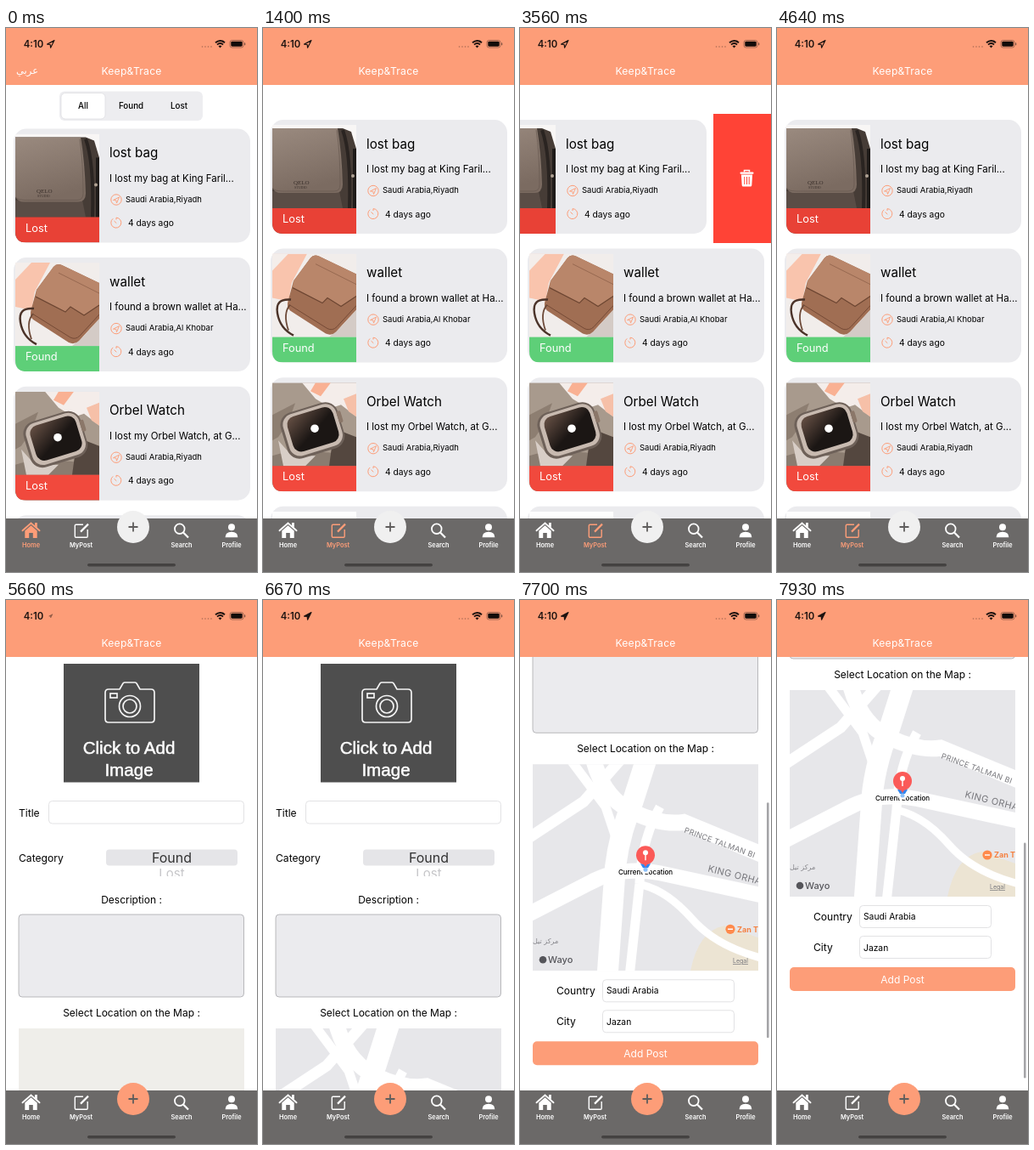
Write an HTML page that moves like this. It is 296 px wide and 640 px high and loops after 8 s.

```html
<!DOCTYPE html>
<html lang="en">
<head>
<meta charset="utf-8">
<title>Lost items app</title>
<style>
  html, body { margin: 0; width: 100%; height: 100%; overflow: hidden; background: #fff; }
  svg { display: block; width: 296px; height: 640px; font-family: Inter, sans-serif; }
  .mid { text-anchor: middle; }
  .arabic { font-family: "DejaVu Sans", "Noto Sans", sans-serif; }
</style>
</head>
<body>
<svg id="stage" viewBox="0 0 296 640" xmlns="http://www.w3.org/2000/svg"></svg>
<script>
const LOOP = 8000;
const SALMON = '#fd9d78', RED = '#ff4336', GREEN = '#4bcb69', CARD = '#ebebee';
const PITCH = 151.6;

const text = (x, y, size, str, attrs = '') =>
  `<text x="${x}" y="${y}" font-size="${size}" ${attrs}>${str}</text>`;
const mid = (x, y, size, str, attrs = '') => text(x, y, size, str, 'class="mid" ' + attrs);
const rect = (x, y, w, h, fill, rx = 0, attrs = '') =>
  `<rect x="${x}" y="${y}" width="${w}" height="${h}" rx="${rx}" fill="${fill}" ${attrs}/>`;
const circle = (x, y, r, fill, attrs = '') =>
  `<circle cx="${x}" cy="${y}" r="${r}" fill="${fill}" ${attrs}/>`;
const path = (d, fill, attrs = '') => `<path d="${d}" fill="${fill}" ${attrs}/>`;
const line = (d, color, width, attrs = '') =>
  path(d, 'none', `stroke="${color}" stroke-width="${width}" ${attrs}`);

// Photos, in card coordinates
const bag = () =>
  rect(11, 6, 99, 128, '#f8f6f5') +
  path('M11 10H94L104 14 110 34V134H11Z', '#463c36') +
  path('M11 84H90L94 104H11Z', '#5a4d46') +
  path('M11 10H88Q93 40 94 76Q94 86 85 86H21Q14 86 11 80Z', 'url(#flap)') +
  line('M11 81Q15 84 22 84H84Q91 84 91 76Q91 40 87 12', '#665850', .7) +
  line('M94 12Q104 40 102 104', '#2a2421', 4) +
  line('M108 34V104', '#1f1b19', 4) +
  circle(106, 66, 2, '#b0a294') +
  text(36, 75.5, 7, 'QELO', 'font-family="Liberation Serif, serif" fill="#3a302b"') +
  text(37, 80.5, 4, 'STUDIO', 'font-family="Liberation Serif, serif" fill="#3a302b"');

const wallet = () =>
  rect(11, 6, 99, 128, '#f1edeb') +
  path('M11 6H52L34 40 30 62 11 58Z', '#f9c4ad') +
  path('M11 6H30L11 26Z', '#f4eeeb') +
  path('M92 92 110 72V104H78Z', '#d4cbc6') +
  path('M36 38 56 11Q60 6 66 9L110 30V72L86 98Q81 103 74 100L32 73Q27 69 30 60Z', '#a06e53') +
  path('M36 38 56 11Q60 6 66 9L110 30V56L92 68 76 58 70 64 35 46Z', '#b9866a') +
  line('M35 46 70 64 76 58 92 68 110 56', '#6d4632', 1.2) +
  line('M62 18 110 42', '#8e6149', .8) +
  line('M31 66 76 94Q82 97 87 92L110 67', '#754a36', 1) +
  line('M33 60Q14 58 17 76T36 102', '#4b3329', 2.5) +
  line('M32 66Q23 76 30 96', '#6d4a39', 1.8);

const watch = () =>
  rect(11, 6, 99, 128, '#a89a8d') +
  path('M46 6H110V46L92 32 80 36 62 25Z', '#f4edea') +
  path('M62 6 80 6 68 22 56 16Z', '#f9b193') +
  path('M95 25 110 19V46L101 40Z', '#f6c0a8') +
  path('M11 92Q40 82 110 92V134H11Z', '#8a7c70') +
  path('M11 44 38 30 30 52 18 70 11 74Z', '#8d7e71') +
  path('M84 60 110 70V104H78Z', '#54473f') +
  path('M18 74 34 92 62 92 50 104H24Z', '#d8cec7') +
  `<g transform="translate(59 61) rotate(-17)">` +
  rect(-36, -27, 70, 56, '#6e6159', 15) + rect(-33, -25, 65, 51, '#c8bab0', 13) +
  rect(-28, -21.5, 56, 43, 'url(#screen)', 10) + rect(32, -12, 5, 14, '#8b7769', 2) + '</g>' +
  circle(61, 60, 4.8, '#fff');

const ITEMS = [
  { photo: bag, found: 0, title: 'lost bag', about: 'I lost my bag at King Faril...', city: 'Riyadh' },
  { photo: wallet, found: 1, title: 'wallet', about: 'I found a brown wallet at Ha...', city: 'Al Khobar' },
  { photo: watch, found: 0, title: 'Orbel Watch', about: 'I lost my Orbel Watch, at G...', city: 'Riyadh' },
  { photo: () => rect(11, 6, 99, 128, '#fdfdfd'), found: 0, title: '', about: '', city: 'Riyadh' }
];

const placeIcon = circle(130, 83.5, 6.2, 'none', `stroke="${SALMON}"`) +
  line('M126.5 84 133.5 80.5 130.5 87.5 129.8 84.3Z', SALMON, .9);
const clockIcon = line('M126.2 105.8A6 6 0 1 0 130 104.6V107M127.5 108.5 130.3 111.2', SALMON, 1);

const card = (item, i) => `<g class="card" data-y="${i * PITCH}">` +
  rect(9, 0, 279, 134, CARD, 15) +
  `<g clip-path="url(#photo)">${item.photo()}` +
  rect(11, 104, 99, 30, item.found ? GREEN : RED, 0, 'opacity=".88"') + '</g>' +
  text(23, 121, 12.8, item.found ? 'Found' : 'Lost', 'fill="#fff"') +
  text(122, 33.5, 15.2, item.title) +
  text(122, 62, 11.5, item.about) +
  placeIcon + text(141, 86, 9.5, 'Saudi Arabia,' + item.city) +
  clockIcon + text(144, 114.5, 10.3, '4 days ago') + '</g>';

const trash = `<g fill="#fff">` + rect(-8, -7.5, 16, 2.2, '#fff', 1) +
  line('M-3 -7.5V-9.5H3V-7.5', '#fff', 1.5) +
  path('M-6.6 -4.4H6.6L5.8 8Q5.7 9.5 4.2 9.5H-4.2Q-5.7 9.5 -5.8 8Z', '#fff') +
  line('M-2.7 -2V7M0 -2V7M2.7 -2V7', RED, 1) + '</g>';

const segments = rect(63, 74.5, 169, 34.5, '#ededf0', 6) +
  rect(65, 76.5, 52, 30.5, '#fff', 5, 'stroke="#dcdce0" stroke-width=".7"') +
  ['All', 'Found', 'Lost'].map((name, i) =>
    mid(91 + i * 56.5, 95.3, 9.8, name, 'font-weight="500"')).join('');

const field = (x, y, w, h) => rect(x, y, w, h, '#fff', 4, 'stroke="#e2e2e4"');

const mapArt = rect(0, 0, 266, 243, '#e7e7ea') +
  path('M186 243Q196 195 226 190L266 204V243Z', '#ece4d3') +
  line('M72 -4Q84 40 118 56T178 68L270 106', '#fff', 19) +
  line('M134 -6 118 44Q98 92 96 140L88 250', '#fff', 25) +
  line('M150 50Q128 90 126 140L114 250', '#fff', 11) +
  line('M44 -6 86 50 100 92', '#fff', 11) +
  line('M-4 176 66 140Q104 119 150 128L270 154', '#fff', 18) +
  line('M130 142Q160 150 188 182T270 228', '#fff', 9) +
  line('M-4 86 60 44 104 -6', '#fff', 13) +
  text(0, 0, 9, 'PRINCE TALMAN BI', 'transform="translate(178 80) rotate(20)" fill="#77777c" letter-spacing=".3"') +
  text(0, 0, 11, 'KING ORHAL', 'transform="translate(206 126) rotate(14)" fill="#77777c" letter-spacing=".4"') +
  circle(233, 194, 5.6, '#ff8a4c') + line('M230 194H236', '#fff', 1.4) +
  text(241, 197.3, 9, 'Zan Tr', `font-weight="700" fill="#f5803f"`) +
  text(0, 211, 8, 'مركز تيل', 'class="arabic" fill="#85858a"') +
  circle(12, 230, 4.3, '#55555a') + text(18, 234, 11, 'Wayo', 'fill="#55555a" font-weight="500"') +
  text(236, 234, 7, 'Legal', 'fill="#77777c" text-decoration="underline"') +
  mid(133, 130, 8, 'Current Location', 'font-weight="500" stroke="#fff" stroke-width="2" paint-order="stroke"') +
  circle(133, 122, 6.5, '#fff') + path('M127 117H139L136 122H130Z', '#2f86f0') +
  circle(133, 124, 2.5, '#8cc0f8') +
  path('M130 116H136L133 121Z', '#fb5a58') + circle(133, 107, 11, '#fb5a58') +
  circle(133, 104, 3, '#fff') + line('M133 106V113', '#fff', 1.4);

const arial = 'font-family="Liberation Sans, sans-serif" fill="#fff" stroke="#fff" stroke-width=".5"';
const form =
  rect(68, 75, 160, 139.5, '#4e4e4e') +
  `<g fill="none" stroke="#f4f4f4" stroke-width="1.7">` +
  '<path d="M121 105H134L138 98Q139 97 140 97H152Q153 97 154 98L158 105H171Q175 105 175 109V140Q175 144 171 144H121Q117 144 117 140V109Q117 105 121 105Z"/>' +
  '<circle cx="146" cy="125" r="12.5"/><circle cx="146" cy="125" r="8"/>' +
  '<rect x="123" y="110" width="8" height="5"/></g>' +
  mid(145, 181, 20.6, 'Click to Add', arial) + mid(145, 207, 20.6, 'Image', arial) +
  text(15, 254.5, 12.1, 'Title') + field(50.5, 236.5, 230, 26.5) +
  text(15, 308, 12.1, 'Category') + rect(118, 293.5, 155, 19, '#e5e5e8', 4) +
  mid(195.5, 309, 16, 'Found', 'fill="#333"') +
  `<g clip-path="url(#wheel)">` + mid(195.5, 326.5, 15, 'Lost', 'fill="#c6c6c9"') + '</g>' +
  mid(148, 356.5, 12, 'Description :') +
  rect(15, 370, 265.5, 97, CARD, 4, 'stroke="#a9a9ac" stroke-width=".8"') +
  mid(148, 490, 12, 'Select Location on the Map :') +
  `<g transform="translate(15 504)" clip-path="url(#mapBox)">` + rect(0, 0, 266, 243, '#efeeea') +
  `<g id="map">${mapArt}</g></g>` +
  text(43, 775, 12.1, 'Country') + field(97.5, 757.5, 155, 26) + text(102, 774, 10.3, 'Saudi Arabia') +
  text(43, 811, 12.1, 'City') + field(97.5, 793.5, 155, 26) + text(102, 810.5, 10.3, 'Jazan') +
  rect(15, 830, 266, 28, SALMON, 5) + mid(148, 848.5, 12, 'Add Post', 'fill="#fff"');

const header = rect(0, 0, 296, 67, SALMON) +
  text(20.8, 23, 11.3, '4:10', 'font-weight="600" fill="#1d1310"') +
  `<g id="arrow">${path('M-4.2 .3 4.2 -4.2 -.2 4.4 -.6 .7Z', 'none', 'stroke="#1d1310" stroke-width="1.2" stroke-linejoin="round"')}</g>` +
  [231.5, 235, 238.5, 242].map(x => circle(x, 22, .8, '#a96b53')).join('') +
  line('M247 17.3Q252.5 12.6 258 17.3M249 19.6Q252.5 16.6 256 19.6', '#1d1310', 1.9) +
  path('M250.5 21.3Q252.5 19.6 254.5 21.3L252.5 23.4Z', '#1d1310') +
  rect(264, 14.5, 16, 8.5, 'none', 2.5, 'stroke="#8d5a47" stroke-width=".8"') +
  rect(265.3, 15.8, 13.4, 5.9, '#120c0a', 1.4) + rect(281, 17.3, 1.3, 3, '#8d5a47', .6) +
  mid(148, 54.5, 12.2, 'Keep&amp;Trace', 'fill="#fff" letter-spacing=".2"') +
  text(12, 54, 11.5, 'عربي', 'id="lang" class="arabic" fill="#fff"');

// Name, page it opens, label centre, icon
const TABS = [
  ['Home', 'home', 29.5,
    line('M19.5 591.3 29.5 582.6 39.5 591.3', 'currentColor', 1.9, 'stroke-linecap="round"') +
    path('M34 582H36.8V588L34 585.5ZM22.3 591.6 29.5 585.3 36.7 591.6V600H31.8V594H27.2V600H22.3Z', 'currentColor')],
  ['MyPost', 'posts', 88.5,
    line('M91 584.3H82.5Q81.3 584.3 81.3 585.5V598Q81.3 599.2 82.5 599.2H95Q96.2 599.2 96.2 598V590', 'currentColor', 1.4) +
    line('M88 592.6 97 583.6', 'currentColor', 2.2)],
  ['Search', 'search', 207,
    line('M209.3 593.8 215 599.5', 'currentColor', 2.2) +
    circle(204.8, 589.2, 5.8, 'none', 'stroke="currentColor" stroke-width="1.8"')],
  ['Profile', 'profile', 266,
    circle(266, 587.2, 4, 'currentColor') +
    path('M258.6 599.3Q258.6 592.7 266 592.7T273.4 599.3Z', 'currentColor')]
];
const tabBar = rect(0, 577, 296, 63, '#6b6968') +
  TABS.map(([name, , x, icon]) => `<g class="tab">${icon}` +
    mid(x, 611, 7.4, name, 'font-weight="600" fill="currentColor"') + '</g>').join('') +
  circle(150, 587, 19, '#f0f0f0', 'id="plus"') + line('M144.5 587H155.5M150 581.5V592.5', '#5f5d5c', 1.8) +
  rect(96, 630, 104, 3.6, '#444241', 1.8);

document.getElementById('stage').innerHTML = `<defs>
  <linearGradient id="flap" x2=".3" y2="1"><stop stop-color="#9a8a7f"/><stop offset="1" stop-color="#7b6b61"/></linearGradient>
  <linearGradient id="screen" x2=".8" y2="1"><stop stop-color="#6a5347"/><stop offset=".6" stop-color="#1b1614"/></linearGradient>
  <clipPath id="photo"><path d="M11 6H110V134H24Q11 134 11 121Z"/></clipPath>
  <clipPath id="wheel"><rect x="118" y="314" width="155" height="11"/></clipPath>
  <clipPath id="mapBox"><rect width="266" height="243"/></clipPath>
  <clipPath id="view"><rect y="67" width="296" height="510"/></clipPath></defs>
  ${rect(0, 0, 296, 640, '#fff')}
  <g clip-path="url(#view)">
    <g id="list"><g id="segments">${segments}</g>
      <g id="remove">${rect(0, 101, 296, 152, RED)}<g transform="translate(39.5 177)">${trash}</g></g>
      ${ITEMS.map(card).join('')}</g>
    <g id="form">${form}</g>
    <rect id="bar" x="291" width="2.6" height="277" rx="1.3" fill="#a5a5a8"/>
  </g>${header}${tabBar}`;

const el = id => document.getElementById(id);
const cards = [...document.querySelectorAll('.card')];
const tabs = [...document.querySelectorAll('.tab')];
const show = (id, on) => el(id).setAttribute('display', on ? 'inline' : 'none');
const move = (node, x, y, more = '') => node.setAttribute('transform', `translate(${x} ${y})${more}`);
const clamp = v => Math.max(0, Math.min(1, v));
const smooth = (t, a, b) => { const p = clamp((t - a) / (b - a)); return p * p * (3 - 2 * p); };

// Holds the time at n even steps between a and b
function held(t, a, b, n) {
  if (t < a) return 0;
  const gap = (b - a) / (n - 1);
  return a + Math.min(n - 1, Math.floor((t - a) / gap + .02)) * gap;
}

function draw(t) {
  const page = t < 1280 ? 'home' : t < 5330 ? 'posts' : 'add';
  const home = page === 'home', add = page === 'add';
  const swipe = 68 * (smooth(held(t, 2890, 3560, 7), 2780, 3560) - smooth(held(t, 3860, 4640, 8), 3750, 4530));
  const scroll = 398 * smooth(held(t, 7240, 7930, 7), 7170, 7930);

  show('list', !add);
  show('form', add);
  show('segments', home);
  show('lang', home);
  show('remove', swipe > .1);
  show('map', t >= 6250);
  show('bar', scroll > 0);

  const top = home ? 118.5 : 108;
  cards.forEach((c, i) => move(c, i ? 0 : -swipe, top + +c.dataset.y));
  move(el('remove'), 296 - swipe, 0);
  move(el('form'), 0, -scroll);
  el('bar').setAttribute('y', 69.5 + scroll * .543);

  const filled = t >= 5540;
  const grown = filled ? smooth(t, 5660, 5900) : 1;
  move(el('arrow'), 52.8, 18.8, ` scale(${.5 + .5 * grown})`);
  el('arrow').setAttribute('opacity', .5 + .5 * grown);
  el('arrow').firstChild.setAttribute('fill', filled ? '#1d1310' : 'none');

  tabs.forEach((tab, i) => tab.setAttribute('color', TABS[i][1] === page ? SALMON : '#fff'));
  el('plus').setAttribute('fill', add ? SALMON : '#f0f0f0');
}

const start = performance.now();
function frame() {
  draw((performance.now() - start) % LOOP);
  requestAnimationFrame(frame);
}
draw(0);
requestAnimationFrame(frame);
</script>
</body>
</html>
```
